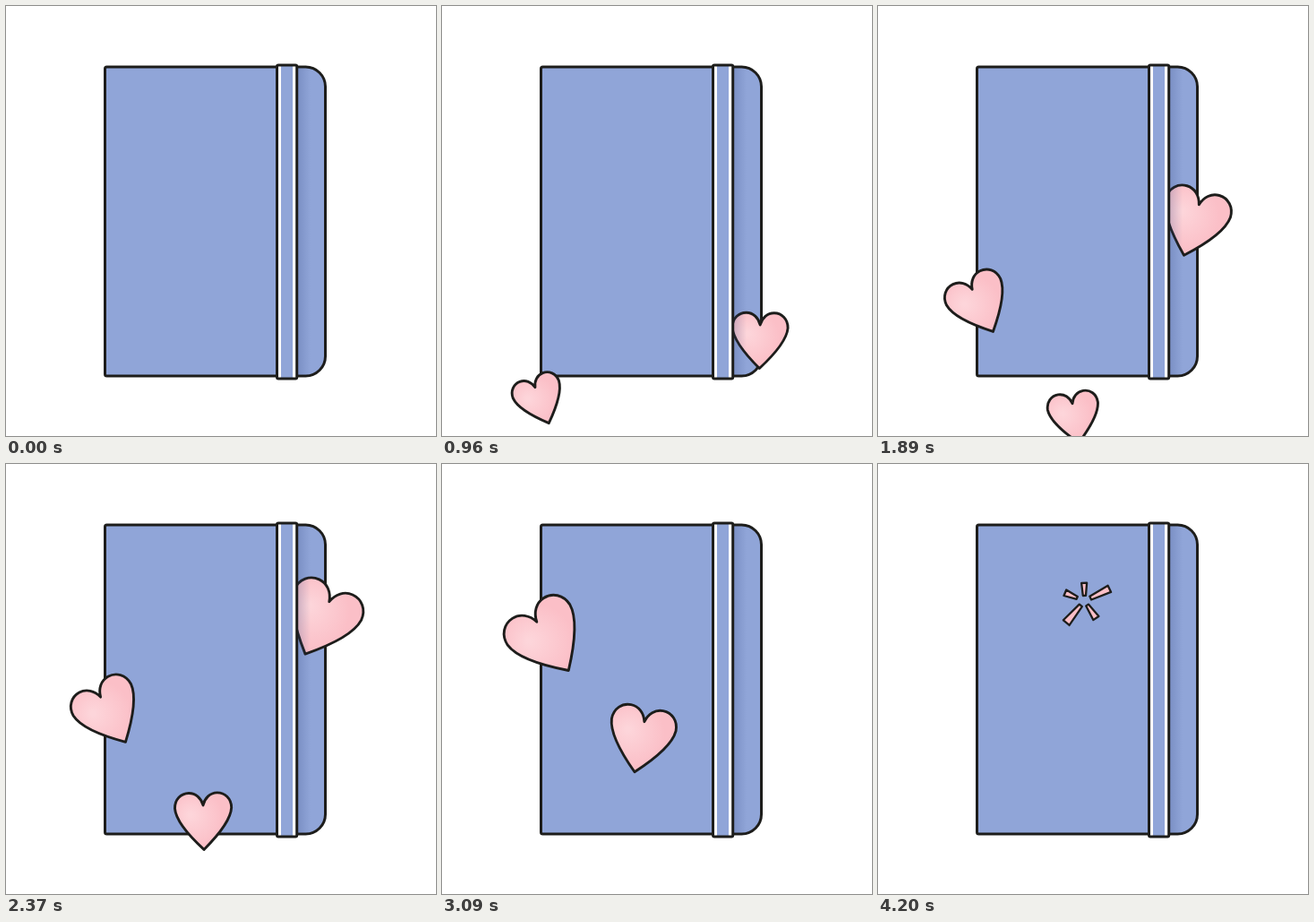
Write an HTML page with a canvas that moves like this. It is 480 px wide and 480 px high and loops after 4300 ms.

```html
<!DOCTYPE html>
<html lang="en">
<head>
<meta charset="utf-8">
<title>Notebook and hearts</title>
<style>
  html, body { margin: 0; width: 100%; height: 100%; overflow: hidden; background: #fff; }
  canvas { display: block; width: 480px; height: 480px; }
</style>
</head>
<body>
<canvas id="stage" width="480" height="480"></canvas>
<script>
const ctx = document.getElementById('stage').getContext('2d');
const LOOP = 4300, STEP = 30, LAST = 4200;
const INK = '#1d1d1b', BLUE = '#90a5d8', PINK = '#fbbfc7', LIGHT = '#fdd5da';
const RAD = Math.PI / 180;

// Linear motion: value at time zero and change per second; pop is when the burst begins.
const hearts = [
  { x: [359.65, -5.1], y: [514.4, -140], turn: [-15.2, 16.8], size: [40.5, 12], pop: 2730 },
  { x: [106.2, 5.55], y: [554.7, -113.8], turn: [-15.5, -5.7], size: [35.3, 11.1], pop: 3990 },
  { x: [220.5, 0], y: [701.7, -125], turn: [-41.2, 16.9], size: [26, 11.4], pop: 4110 }
];

// Each ray: angle, inner and outer radius, inner and outer half width.
const rays = [
  [-91, 6, 20.2, 1.6, 3],
  [-26, 7.5, 31, 2, 4],
  [203, 9, 23.5, 1.5, 3.5],
  [130, 6.5, 31.5, 2, 4.4],
  [56, 5.5, 23, 1.6, 3.7]
];
const INNER = [0.4, 0.6, 0.8, 1, 1.7, 2.4];
const OUTER = [0.5, 0.74, 0.9, 1, 1.05, 1.08];

const heartPath = new Path2D(
  'M0 24.5C-13 12-30-6-31-21C-31-31-24-37.5-15.5-37.5' +
  'C-8-37.5-2-32 0-24C2-32 8-37.5 15.5-37.5C24-37.5 31-31 31-21C30-6 13 12 0 24.5Z');

function outline(path, width) {
  ctx.lineWidth = width;
  ctx.strokeStyle = INK;
  ctx.lineJoin = 'round';
  ctx.stroke(path);
}

function box(x, y, w, h, radii) {
  const path = new Path2D();
  path.roundRect(x, y, w, h, radii);
  return path;
}

const cover = box(110.5, 68, 246, 345, [2, 22, 22, 2]);
const band = box(302.5, 66, 22.2, 350, 1.5);

const shade = ctx.createLinearGradient(326, 0, 340, 0);
shade.addColorStop(0, 'rgba(50,70,130,.22)');
shade.addColorStop(1, 'rgba(50,70,130,0)');

const blush = ctx.createRadialGradient(-14, -14, 2, -10, -10, 32);
blush.addColorStop(0, LIGHT);
blush.addColorStop(1, PINK);

function drawCover() {
  ctx.fillStyle = BLUE;
  ctx.fill(cover);
  outline(cover, 3);
}

function drawBand() {
  ctx.save();
  ctx.clip(cover);
  ctx.fillStyle = shade;
  ctx.fillRect(326, 69.5, 14, 342);
  ctx.restore();
  ctx.fillStyle = '#fff';
  ctx.fill(band);
  ctx.fillStyle = BLUE;
  ctx.fillRect(307, 67, 13, 348);
  outline(band, 3);
}

function drawHeart(scale) {
  ctx.scale(scale, scale);
  ctx.fillStyle = blush;
  ctx.fill(heartPath);
  outline(heartPath, 2.9 / scale);
}

function drawBurst(scale, step) {
  ctx.translate(-2.2 * scale, -18 * scale);
  ctx.rotate(-29.8 * RAD);
  ctx.scale(scale / 1.42, scale / 1.42);
  for (const [angle, from, to, thin, wide] of rays) {
    const a = from * INNER[step], b = to * OUTER[step];
    const ray = new Path2D(`M${a} ${-thin}L${b} ${-wide}L${b} ${wide}L${a} ${thin}Z`);
    ctx.save();
    ctx.rotate(angle * RAD);
    ctx.fillStyle = PINK;
    ctx.fill(ray);
    outline(ray, 2.3);
    ctx.restore();
  }
}

function render(time) {
  const at = ([start, rate]) => start + rate * time / 1000;
  ctx.fillStyle = '#fff';
  ctx.fillRect(0, 0, 480, 480);
  drawCover();
  for (const h of hearts) {
    const step = Math.floor((time - h.pop) / STEP);
    if (step >= INNER.length) continue;
    const scale = at(h.size) / 52;
    ctx.save();
    ctx.translate(at(h.x), at(h.y));
    ctx.rotate(at(h.turn) * RAD);
    if (step < 0) drawHeart(scale);
    else drawBurst(scale, step);
    ctx.restore();
  }
  drawBand();
}

const begin = performance.now();
function tick() {
  const t = (performance.now() - begin) % LOOP;
  render(Math.min(Math.floor(t / STEP) * STEP, LAST));
  requestAnimationFrame(tick);
}
tick();
</script>
</body>
</html>
```
